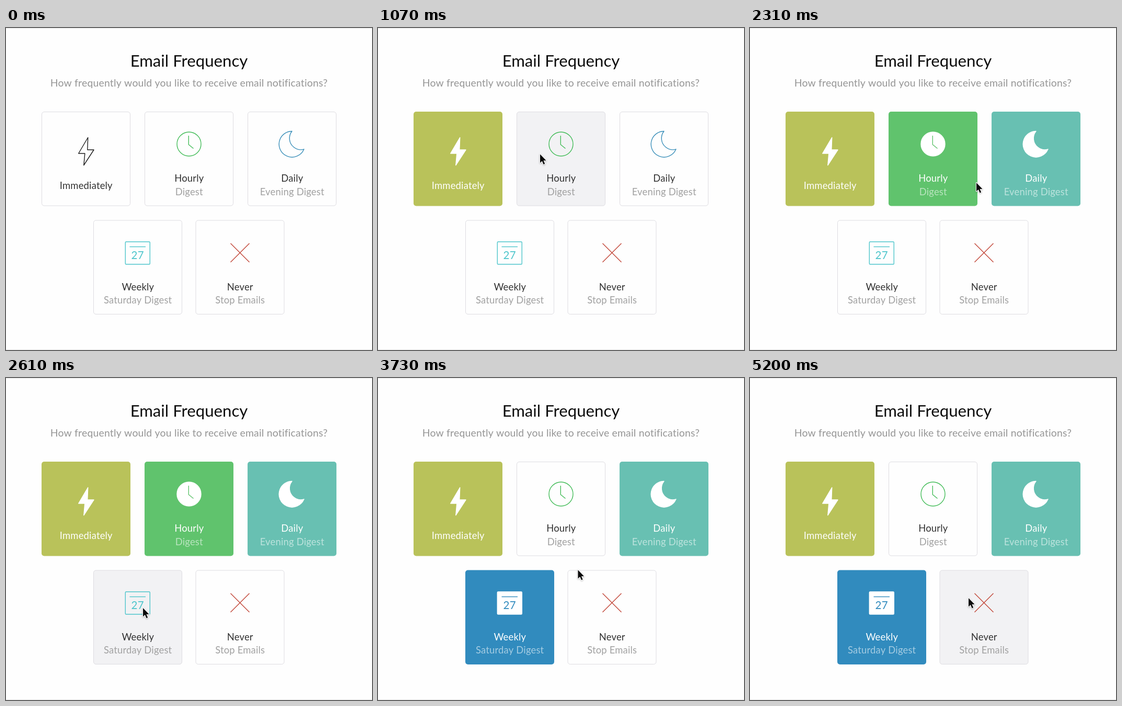
An HTML page with a canvas that plays this animation: 700x616 px, repeating every 6.2 s.

```html
<!DOCTYPE html>
<html lang="en">
<head>
<meta charset="utf-8">
<title>Email Frequency</title>
<style>
  html, body { margin: 0; width: 100%; height: 100%; overflow: hidden; background: #fefefe; }
  canvas { display: block; }
</style>
</head>
<body>
<canvas id="stage" width="700" height="616"></canvas>
<script>
const ctx = document.getElementById('stage').getContext('2d');
const LOOP = 6200, STEP = 60;
const CARD_W = 170, CARD_H = 180.5;
const WHITE = '#fff';

// Bursts of movement; the picture rests between them.
const bursts = [[0, 0], [60, 300], [650, 1130], [1480, 1960], [2310, 2610],
  [2960, 3320], [3670, 3850], [4200, 4200], [5200, 5200]];

const linear = p => p;
const smooth = p => p * p * (3 - 2 * p);
const easeOut = p => p * (2 - p);

// Cursor path: time, x, y, easing towards this point.
const path = [
  [60, 38, 300, linear],
  [300, 118, 258, easeOut],
  [650, 120, 257, linear],
  [1070, 310, 241.5, smooth],
  [1130, 312, 241.5, linear],
  [1480, 314, 241.5, linear],
  [1840, 511, 250.5, smooth],
  [1960, 515, 251, easeOut],
  [2310, 433, 296, linear],
  [2610, 262, 440, easeOut],
  [2960, 268, 416, linear],
  [3080, 302, 320.5, linear],
  [3320, 318, 268, easeOut],
  [3670, 338, 300, linear],
  [3850, 418, 421, easeOut]
];

// on / off: times at which each card is picked and released.
const cards = [
  { x: 68, y: 160, label: 'Immediately', icon: bolt, line: '#1c1c1c',
    fill: '#b9c25a', pale: '#dae0a2', on: 650, off: LOOP },
  { x: 265, y: 160, label: 'Hourly', note: 'Digest', icon: clock, line: '#45bd5a',
    fill: '#60c36d', pale: '#fefefe', on: 1480, off: 3670 },
  { x: 462, y: 160, label: 'Daily', note: 'Evening Digest', icon: moon, line: '#3a8fb9',
    fill: '#68c0b2', pale: '#b0e0dc', on: 2310, off: LOOP },
  { x: 167, y: 367.5, label: 'Weekly', note: 'Saturday Digest', icon: calendar, line: '#4dc5cb',
    fill: '#318bbe', pale: '#8cc3e3', on: 2960, off: LOOP },
  { x: 362.5, y: 367.5, label: 'Never', note: 'Stop Emails', icon: cross, line: '#c3493b',
    fill: '#da4b40', on: 4200, off: 5200 }
];

function snap(t) {
  const [start, end] = bursts.filter(b => b[0] <= t).pop();
  return Math.min(end, start + Math.floor((t - start) / STEP) * STEP);
}

function cursorAt(t) {
  if (t < path[0][0]) return null;
  const i = path.findIndex(k => k[0] > t);
  if (i < 0) return path[path.length - 1].slice(1, 3);
  const [t0, x0, y0] = path[i - 1], [t1, x1, y1, ease] = path[i];
  const p = ease((t - t0) / (t1 - t0));
  return [x0 + (x1 - x0) * p, y0 + (y1 - y0) * p];
}

function text(str, x, y, size, color, spacing = 0.2) {
  ctx.font = `${size}px Lato, "Open Sans", sans-serif`;
  ctx.letterSpacing = spacing + 'px';
  ctx.textAlign = 'center';
  ctx.fillStyle = color;
  ctx.fillText(str, x, y);
}

function trace(points, close) {
  ctx.beginPath();
  points.forEach(([x, y]) => ctx.lineTo(x, y));
  if (close) ctx.closePath();
}

function roundBox(x, y, w, h, r) {
  ctx.beginPath();
  ctx.moveTo(x + r, y);
  ctx.arcTo(x + w, y, x + w, y + h, r);
  ctx.arcTo(x + w, y + h, x, y + h, r);
  ctx.arcTo(x, y + h, x, y, r);
  ctx.arcTo(x, y, x + w, y, r);
  ctx.closePath();
}

function paint(color, solid) {
  ctx.strokeStyle = ctx.fillStyle = solid ? WHITE : color;
  if (solid) ctx.fill();
  ctx.stroke();
}

// Icons are drawn around the middle of the card's top edge.
function bolt(color, solid) {
  trace([[3.7, 49.5], [-14.3, 80], [-2.2, 80], [-4.2, 102.5], [15, 73], [2.8, 73]], true);
  paint(color, solid);
}

function clock(color, solid) {
  ctx.beginPath();
  ctx.arc(0, 62, 23, 0, Math.PI * 2);
  paint(color, solid);
  trace([[-0.7, 46], [-0.7, 63], [8.5, 70.5]]);
  ctx.strokeStyle = color;
  ctx.stroke();
}

function moon(color, solid) {
  const cx = 0, cy = 62.3, bx = 17, by = 51;
  ctx.beginPath();
  ctx.arc(cx, cy, 24.8, Math.atan2(9.5, 23), -Math.PI / 2);
  ctx.arc(bx, by, 21.8, Math.atan2(37.5 - by, -bx), Math.atan2(71.8 - by, 23 - bx), true);
  ctx.closePath();
  paint(color, solid);
}

function calendar(color, solid) {
  roundBox(-23.7, 41.5, 47, 43, 1.5);
  paint(color, solid);
  trace([[-15.5, 51], [15, 51]]);
  ctx.strokeStyle = color;
  ctx.stroke();
  text('27', -0.3, 74.3, 20.5, color);
}

function cross(color, solid) {
  for (const s of [1, -1]) {
    trace([[-18 * s, 44.5], [18 * s, 80.5]]);
    ctx.strokeStyle = solid ? WHITE : color;
    ctx.stroke();
  }
}

function drawCard(c, t, tip, muted) {
  const picked = t >= c.on && t < c.off;
  const hover = tip && tip[0] > c.x + 4 && tip[0] < c.x + CARD_W - 4 &&
    tip[1] > c.y && tip[1] < c.y + CARD_H;
  const dim = muted && c.pale;
  const fill = dim ? c.pale : c.fill;

  ctx.save();
  ctx.translate(c.x, c.y);
  if (picked) {
    roundBox(0, 0, CARD_W, CARD_H, 5);
    ctx.fillStyle = fill;
    ctx.fill();
    if (hover) {
      ctx.fillStyle = 'rgba(255,255,255,.12)';
      ctx.fill();
    }
  } else {
    roundBox(0.5, 0.5, CARD_W - 1, CARD_H - 1, 4.5);
    ctx.fillStyle = hover ? '#f2f2f4' : '#fefefe';
    ctx.fill();
    ctx.lineWidth = 1;
    ctx.strokeStyle = dim ? '#ebebeb' : '#dddce1';
    ctx.stroke();
  }

  ctx.translate(CARD_W / 2, 0);
  ctx.lineWidth = 1.4;
  ctx.lineJoin = 'round';
  const tone = picked ? fill : dim ? '#929292' : c.line;
  c.icon(tone, picked);

  const ink = picked ? WHITE : dim ? '#8b8b8b' : '#303030';
  const soft = picked ? 'rgba(255,255,255,.56)' : dim ? '#cdcdcd' : '#a1a1a1';
  text(c.label, 0.3, c.note ? 134 : 147.5, 18.4, ink);
  if (c.note) text(c.note, 0.2, 159.7, 18.4, soft);
  ctx.restore();
}

function drawCursor([x, y]) {
  ctx.save();
  ctx.translate(x, y);
  trace([[0, 0], [0, 16.5], [3.8, 13], [6.6, 19.4], [9.2, 18.3], [6.5, 12], [11.6, 12]], true);
  ctx.lineJoin = 'round';
  ctx.lineWidth = 2.2;
  ctx.strokeStyle = WHITE;
  ctx.shadowColor = 'rgba(0,0,0,.28)';
  ctx.shadowBlur = 3;
  ctx.shadowOffsetY = 1;
  ctx.stroke();
  ctx.shadowColor = 'transparent';
  ctx.fillStyle = '#0a0a0a';
  ctx.fill();
  ctx.restore();
}

function draw(time) {
  const t = snap(time % LOOP);
  const tip = cursorAt(t);
  const never = cards[4];
  const muted = t >= never.on && t < never.off;

  ctx.fillStyle = '#fefefe';
  ctx.fillRect(0, 0, 700, 616);
  ctx.fillStyle = '#e6e6e6';
  ctx.fillRect(0, 0, 700, 1);
  ctx.fillRect(0, 615, 700, 1);

  text('Email Frequency', 350, 73.5, 31.2, '#0c0c0c', 0);
  text('How frequently would you like to receive email notifications?', 350, 112, 19.4, '#959595');
  cards.forEach(c => drawCard(c, t, tip, muted));
  if (tip) drawCursor(tip);
}

const begin = performance.now();
function tick() {
  draw(performance.now() - begin);
  requestAnimationFrame(tick);
}
tick();
</script>
</body>
</html>
```
